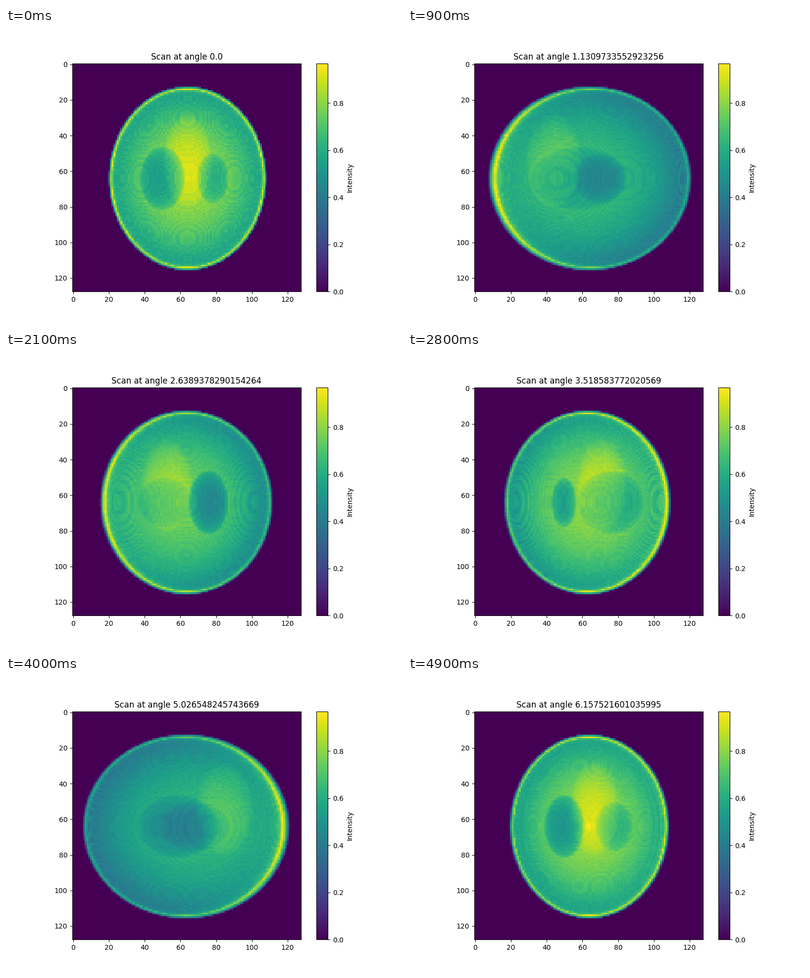
Write a matplotlib script that moves like this. It is 800 px wide and 600 px high and loops after 5 s.

```python
import numpy as np
import matplotlib.pyplot as plt
from matplotlib.animation import FuncAnimation

SIZE = 128
FRAMES = 50
PEAK = 0.9688  # top of the intensity scale


def build_phantom():
    """Head phantom as a volume indexed [y, x, z]."""
    axis = np.arange(SIZE) / (SIZE / 2) - 1
    y, x, z = np.meshgrid(axis, axis, axis, indexing="ij", sparse=True)
    volume = np.zeros((SIZE, SIZE, SIZE), dtype=np.float32)

    def add(density, a, b, c, x0=0, y0=0, z0=0, tilt=0):
        cos, sin = np.cos(np.radians(tilt)), np.sin(np.radians(tilt))
        u = (x - x0) * cos - (y - y0) * sin
        v = (x - x0) * sin + (y - y0) * cos
        inside = (u / a) ** 2 + (v / b) ** 2 + ((z - z0) / c) ** 2 <= 1
        volume[inside] += density

    # skull and brain
    add(1, 0.69, 0.92, 0.81)
    add(-0.8, 0.6624, 0.874, 0.78, y0=0.0184)

    # ventricles, mirrored in place and tilt; the left one is larger
    for side in (-1, 1):
        grow = 0.05 * (side < 0)
        add(-0.2, 0.11 + grow, 0.31 + 2 * grow, 0.22 + 1.2 * grow,
            x0=0.22 * side, tilt=-18 * side)

    # large bright mass and the small spots behind it
    add(0.1, 0.21, 0.25, 0.41, y0=-0.35, z0=-0.15)
    spot = 0.046
    for side in (-1, 1):
        add(0.1, spot, spot, 0.05, y0=0.1 * side)
    add(0.1, spot, spot / 2, spot, x0=-0.08, y0=0.605)
    add(0.1, spot / 2, spot / 2, spot / 2, y0=0.605)
    add(0.1, spot / 2, spot, spot / 2, x0=0.06, y0=0.605)
    return volume


def project(volume, angle):
    """Sum the volume along parallel rays, sampled bilinearly."""
    middle = (SIZE - 1) / 2
    offset = np.arange(SIZE) - middle
    s, t = np.meshgrid(offset, offset, indexing="ij")
    cos, sin = np.cos(angle), np.sin(angle)
    x = np.clip(s * cos - t * sin + middle, 0, SIZE - 1.001)
    y = np.clip(s * sin + t * cos + middle, 0, SIZE - 1.001)
    col, row = x.astype(int), y.astype(int)
    fx, fy = x - col, y - row

    ray = np.arange(SIZE)[:, None] * SIZE**2
    weights = np.zeros(SIZE**3)
    for dy, wy in ((0, 1 - fy), (1, fy)):
        for dx, wx in ((0, 1 - fx), (1, fx)):
            cell = ray + (row + dy) * SIZE + col + dx
            weights += np.bincount(cell.ravel(), (wx * wy).ravel(), SIZE**3)
    weights = weights.reshape(SIZE, -1).astype(np.float32)
    return (weights @ volume.reshape(-1, SIZE)).T


phantom = build_phantom()
angles = np.linspace(0, 2 * np.pi, FRAMES, endpoint=False)
scans = np.array([project(phantom, angle) for angle in angles])
# every scan spans the full colour range
scans *= PEAK / scans.max(axis=(1, 2), keepdims=True)

fig, ax = plt.subplots(figsize=(8, 6), dpi=100)
image = ax.imshow(scans[0], cmap="viridis", vmin=0, vmax=PEAK)
fig.colorbar(image, ax=ax, label="Intensity", use_gridspec=False)
title = ax.set_title(f"Scan at angle {angles[0]}")


def update(frame):
    image.set_data(scans[frame])
    title.set_text(f"Scan at angle {angles[frame]}")
    return image, title


anim = FuncAnimation(fig, update, frames=FRAMES, interval=100, repeat=True)
plt.show()
```
